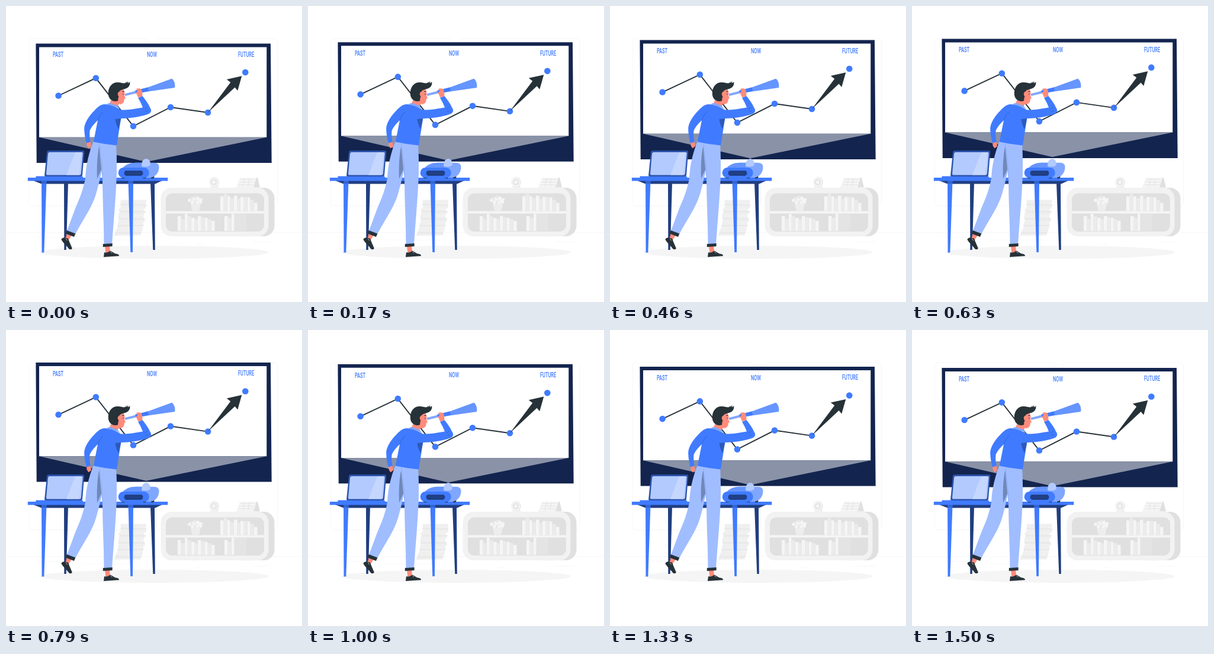
An HTML page that plays this animation: 500 px wide and 500 px high, repeating every 1540 ms.

```html
<!DOCTYPE html>
<html lang="en">
<head>
<meta charset="utf-8">
<title>Looking ahead</title>
<style>
html, body { margin: 0; width: 100%; height: 100%; overflow: hidden; background: #fff; }
svg { display: block; width: 100vw; height: 100vh; }
.label { font: 500 12px Roboto, Arial, sans-serif; fill: #407bff; }
.b { fill: #407bff; } .dk { fill: #263238; } .nv { fill: #13244e; }
.skin { fill: #ff8b7b; } .pale { fill: #a0bdff; }
.g1 { fill: #f5f5f5; } .g2 { fill: #ebebeb; } .g3 { fill: #e0e0e0; }
</style>
</head>
<body>
<svg viewBox="0 0 500 500">
  <g fill="none" stroke="#ebebeb" stroke-width=".4">
    <rect x="38.3" y="55.1" width="204.3" height="282.6" rx="5.7"/>
    <rect x="254.5" y="55.1" width="204.3" height="282.6" rx="5.7"/>
    <path d="M0 382.5H500M417 398.6h33M322 401.3h9M397 389.3h19M52 391h43M105 391h6M131 395.2h94"/>
  </g>
  <ellipse class="g1" cx="250" cy="416" rx="193.5" ry="11"/>

  <g id="cabinet">
    <rect class="g3" x="271" y="307" width="182.5" height="82" rx="18"/>
    <rect x="261.5" y="307" width="182" height="82" rx="18" fill="#f2f2f2"/>
    <rect class="g3" x="270" y="316.5" width="166" height="64.5" rx="11"/>
    <path class="g1" d="M270 346.5H436V350.5H270Z"/>
    <path d="M312 334H329L326 346.5H315Z" fill="#ededed"/>
    <path class="g3" d="M389 306.5L398 290H425L429 306.5Z"/>
    <path class="g1" d="M389 306.5L395 290H423L418 306.5Z"/>
    <path d="M396 293H420M394 297.5H419M392.500 302H418M403 291L400 305M411 291L409 305" stroke="#e0e0e0" stroke-width=".8"/>
    <path class="g2" d="M345 306.500L347 303H356L360 306.500Z"/>
    <circle class="g2" cx="351.5" cy="297.500" r="8.500"/>
    <circle class="g1" cx="350.5" cy="297.500" r="7.5"/>
    <circle cx="351" cy="297.500" r="4.2" fill="#f5f5f5" stroke="#dcdcdc" stroke-width="1.500"/>
  </g>
  <g id="papers" stroke="#e2e2e2" stroke-width=".5"></g>

  <g id="screen">
    <path class="nv" d="M50.4 63.5H447L448.700 265H51.700Z"/>
    <path d="M56 69.5H440.300V221.700H56Z" fill="#fff"/>
    <path d="M56 221.700H440.300L237 263.200Z" fill="#8992a7"/>
    <path d="M88.600 151.500L151.800 121.800L215 203L278 171L341 180" fill="none" stroke="#263238" stroke-width="1.900"/>
    <g id="dots" class="b"></g>
    <path class="dk" d="M341 180L379.300 129L372.800 124L398.300 118.300L391.300 143L386.600 137.500Z"/>
  </g>

  <g id="desk">
    <path d="M98 298H105L101.700 412H98.300ZM244 298H251L251.800 412H248.300Z" fill="#203e80"/>
    <path d="M46 295H264L252 300.500H60Z" fill="#203e80"/>
    <path class="b" d="M36.800 290H273.300V295.500H36.800ZM60 295H68.500L64.300 416.500H60.500ZM206.500 295H215L214 416H210.300Z"/>
    <path d="M60 295.500H68.400L68.200 300H60.200ZM206.500 295.500H215V300H206.700Z" fill="#3264d2"/>
  </g>

  <g id="laptop">
    <path class="b" d="M50.500 287.500H129L131 290.500H52Q50 290.500 50.500 287.500Z"/>
    <path d="M72 244.300H130Q132.400 244.300 132.200 247L129 286Q128.700 288 126.500 288H67Q64.800 288 65.100 285.500L69 247Q69.400 244.300 72 244.300Z" fill="#2c55b0"/>
    <path d="M73.500 247H128Q130 247 129.800 249L126.800 283.500Q126.600 285.500 124.600 285.500H70Q67.800 285.500 68 283.300L71 249.500Q71.300 247 73.500 247Z" fill="#b3caff"/>
    <path d="M117 247H128L124 285.500H102Z" fill="#c6d7ff"/>
    <path class="b" d="M50.500 288.300H129L130 290.500H52Q50.500 290.500 50.500 288.300Z"/>
  </g>

  <g id="projector">
    <path class="dk" d="M195 288h6v3.300h-5zM231 288h5v3.300h-5zM245 288h6l-2 3.300h-4z"/>
    <path d="M229 272C229 263 232 258.300 237 258.300C242 258.300 244.500 264 244 272Z" fill="#b3caff"/>
    <path d="M198 272C204 267 211 265 219 264.800H250C256 265 259 268 258.500 273C258 281 254 288 244 290H214Z" fill="#80a7ff"/>
    <path d="M198 273C204 267 211 265 219 264.800H236L229 273Z" fill="#6695ff"/>
    <path d="M229 270.500C229 263 232 258.300 237 258.300C242 258.300 244.500 264 243.500 269C239 272 234 272 229 270.500Z" fill="#b3caff"/>
    <rect class="b" x="189.700" y="273" width="52" height="17.500" rx="8.500"/>
    <rect x="199.500" y="278" width="32" height="8.700" rx="4" fill="#2c56b3"/>
    <path d="M201 279.300H230M200 281.500H231M200 283.700H231M202 285.800H229" stroke="#13244e" stroke-width="1.100"/>
  </g>

  <g id="man">
    <path class="skin" d="M136 230L142.500 229L144 237L139.500 240.500L136.500 236Z"/>
    <path class="skin" d="M103 384L111 387L106 395L100.500 393ZM167 405H175L176.300 417L168.500 418Z"/>
    <path class="dk" d="M93.300 394.500C95 391 99 390.500 101.500 392.500C104 391 106 394 106.500 397L111.700 409C111.500 411.500 108 412 106 410C103 405 97 401 93.300 394.500Z"/>
    <path class="dk" d="M166 416C170 417.500 174 415.500 176 413.500C179 414 182 418 186 418.500C189 419 191.300 420 191 422.300L165 424Z"/>
    <path d="M176.500 414.500L179 417.500M101 393.500L104 396" stroke="#fff" stroke-width=".7"/>
    <path class="pale" d="M148 228C140 248 135 268 134 291C131 308 125 324 117 342L102.500 381L116.500 386.500C129 362 146 340 152.500 316C157 300 162 280 166 258L165 230Z"/>
    <path d="M157 238L164 252L163 272L154 292C153 274 154 254 157 238Z" fill="#7088b9"/>
    <path class="pale" d="M157 229L186.300 235C187.300 258 187.500 282 186 306C184 340 181 372 179 403H165.500C165.500 367 163 330 163 294C161 270 158 250 157 229Z"/>
    <path d="M158 233C159 253 164 270 163 296" fill="none" stroke="#7f9eea" stroke-width=".6"/>
    <path class="dk" d="M102.700 379L117.300 384.500L115 390L100.700 384.500ZM163.800 402L179.800 401L179.500 406L163.800 407Z"/>

    <path class="b" d="M167 166C158 166 153 173 146 180C138 189 131.500 200 132.200 209C132.500 218 134 225 136 231.500L142.800 229.500C141 222 141 214 141.700 210C145 203 150 198 155 193L147.800 229.500C160 232 173 234 187 235.500L194.300 190C210 190 227 187 239 183C245 181 247 177 243.500 172C240 164 235 158 230.500 152L223 155C226 160 229 166 231 171.500C217 174 203 176 194 175.500C185 170 176 166 167 166Z"/>
    <path d="M184.500 191L194.200 190L190 208C187 202 185 197 184.500 191Z" fill="#2d59bd"/>
    <path d="M155 193C157 187 160 182 164 179M234 174L239 171M235 178L240 177" fill="none" stroke="#2d59bd" stroke-width=".7"/>
    <path class="skin" d="M179 155L193 162L188.500 169L174.500 165.500Z"/>
    <path d="M171 165L176 163.800L188.500 168.500L192.500 173.700Q182 168 171 167Z" fill="#80a7ff"/>
    <path class="skin" d="M186 143L198.500 140C200.500 144 201 148 200 151L202 156L199.800 157C200 162 197.500 165.500 193 166C189 165 185 161 184 157Z"/>
    <path class="dk" d="M189 160.300C180 163 172.800 157 172.800 148C172.300 136 180 128.500 189 129C195 129.300 198 131.300 201.800 130L203.200 127.500L203.700 130.300L206.300 126.800L206 130.500L209.300 128.200C210 134 207 138.800 199 140.500C195 141.500 193 142 191.500 144.500L190.500 153C189 155 189.500 158 189 160.300Z"/>
    <path class="skin" d="M195 150C195 146 192 143.500 190 145.500C187.500 148 189 153 192.500 154Z"/>
    <path class="dk" d="M196 144.300L199.500 143.700V144.700L196.300 145.300Z"/>
    <circle class="dk" cx="197.800" cy="149" r=".8"/>

    <path d="M200.500 148.200L219 143.500L220 147.500L201.300 152Z" fill="#80a7ff"/>
    <path class="b" d="M218 142.800L241 137L242 144L220 148Z"/>
    <path d="M239.500 137.500L280 122.800C284 125 286.500 133 285 138L241.500 144.300Z" fill="#6695ff"/>
    <path class="skin" d="M220 140.500C222 138.500 226 139 228.500 140.500C230.500 144 230.500 149 230.300 152.500L223 154.300C221.500 150.500 221 149 219.500 147C220.500 145 222 144.500 222.500 143Z"/>
  </g>
</svg>
<script>
const $ = id => document.getElementById(id);
const NS = 'http://www.w3.org/2000/svg';
function add(parent, tag, attrs, text) {
  const el = document.createElementNS(NS, tag);
  for (const k in attrs) el.setAttribute(k, attrs[k]);
  if (text) el.textContent = text;
  return parent.appendChild(el);
}

let seed = 7;
const rand = () => (seed = seed * 16807 % 2147483647) / 2147483647;

for (const [cx, cy] of [[88.6, 151.5], [151.8, 121.8], [215, 203], [278, 171], [341, 180], [404.3, 112]])
  add($('dots'), 'circle', { cx, cy, r: 5.3 });

// Labels share one condensed style.
for (const [x, y, word] of [[79, 86.3, 'PAST'], [238, 86.2, 'NOW'], [392, 85.7, 'FUTURE']])
  add($('screen'), 'text', { class: 'label', transform: `translate(${x} ${y}) scale(.62 1)` }, word);

function books(x, floor, heights) {
  heights.forEach((h, i) => {
    const w = i % 3 === 2 ? 5 : 6;
    add($('cabinet'), 'rect', { x, y: floor - h, width: w - .5, height: h, class: i % 2 ? 'g2' : 'g1' });
    x += w;
  });
}
books(362, 346.5, [25, 29, 25, 22, 26, 21, 24, 24, 23, 19, 14]);
books(290, 380, [25, 20, 29, 25, 22, 20, 25, 23, 22, 20, 17]);
books(369, 380, [25, 22, 29]);
add($('cabinet'), 'path', { d: 'M386 351H404Q406 351 406 354V380H386Z', fill: '#e4e4e4' });

for (let i = 0; i < 18; i++) {
  const a = i * 2.4, d = Math.sqrt(i / 18);
  add($('cabinet'), 'circle', { cx: 320.5 + 11 * d * Math.cos(a), cy: 328 + 5.5 * d * Math.sin(a), r: 2.6, fill: i % 3 ? '#f5f5f5' : '#e9e9e9' });
}

for (let i = 0; i < 20; i++) {
  const y = 385 - i * 3, x = 183.5 + i * .5 + rand() * 4, w = 41 + rand() * 3, tilt = rand() * 1.6 - .8;
  add($('papers'), 'path', { d: `M${x} ${y}l${w} ${tilt}v2.4l${-w} ${-tilt}z`, fill: i % 4 === 1 ? '#ebebeb' : '#f3f3f3' });
}

// The screen rises 10 px and sinks again at a steady speed, 24 steps a second.
const LOOP = 1540, STEPS = 37;
function draw(ms) {
  const step = Math.floor((ms % LOOP + 4) * .024) % STEPS;
  const u = (step + 1.2) % STEPS / STEPS;
  const dy = .65 - 10 * (1 - Math.abs(2 * u - 1));
  $('screen').setAttribute('transform', `translate(0 ${dy.toFixed(3)})`);
}
const start = performance.now();
function tick() {
  draw(performance.now() - start);
  requestAnimationFrame(tick);
}
tick();
</script>
</body>
</html>
```
